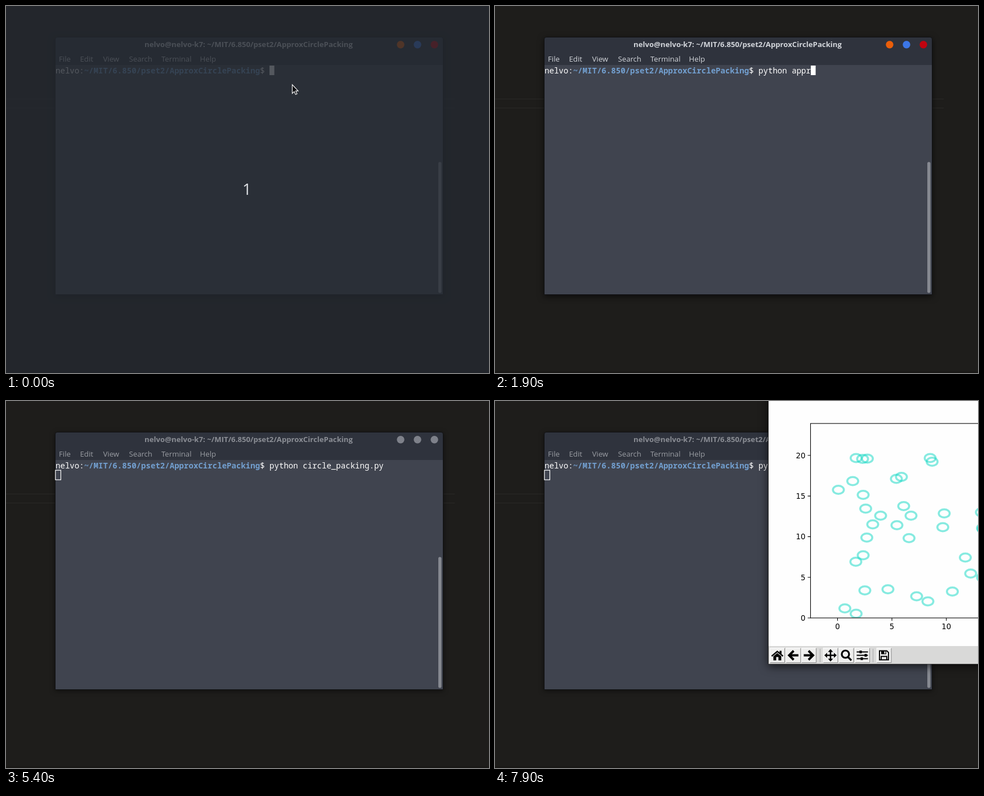
An HTML page for the animation above (8 s loop, 858 px wide and 653 px high).

```html
<!DOCTYPE html>
<html lang="en">
<head>
<meta charset="utf-8">
<title>Circle packing in a terminal</title>
<style>
  html, body { margin: 0; width: 100%; height: 100%; overflow: hidden; background: #1e1d1b; }
  svg { display: block; width: 100vw; height: 100vh; }
  text { white-space: pre; }
  .ui { font-family: "Open Sans", "Noto Sans", sans-serif; font-size: 13.2px; fill: #d3d6db; }
  .title { font-weight: 700; }
  .mono { font-family: "Noto Sans Mono", "DejaVu Sans Mono", monospace; font-size: 14.08px; fill: #fff; }
  .path { font-weight: 700; fill: #729fcf; }
  .count { font-family: "Open Sans", "Noto Sans", sans-serif; font-size: 28px; fill: #dfe2e6; text-anchor: middle; }
  .tick { font-family: "DejaVu Sans", sans-serif; font-size: 13.33px; fill: #000; }
  .frame { fill: #2f333d; stroke: #111214; filter: drop-shadow(0 3px 6px rgba(0, 0, 0, .6)); }
  .blurred .frame { filter: drop-shadow(0 2px 4px rgba(0, 0, 0, .5)); }
  .blurred .title { fill: #8b8e95; }
  .blurred .menu { fill: #9a9da3; }
  .blurred .button { fill: #7e818a; }
  .plot-frame { fill: #fefefe; stroke: #222; filter: drop-shadow(0 4px 8px rgba(0, 0, 0, .65)); }
  .ring { fill: none; stroke: #10d8c4; stroke-opacity: .5; stroke-width: 3.6; }
  .axis { fill: none; stroke: #000; stroke-width: 1.1; }
  .icon { fill: none; stroke: #000; }
  .solid { fill: #000; stroke: none; }
</style>
</head>
<body>
<svg id="stage" viewBox="0 0 858 653" preserveAspectRatio="none">
  <defs>
    <clipPath id="axes"><rect x="560.5" y="40" width="496" height="346"/></clipPath>
  </defs>
  <rect width="858" height="653" fill="#1e1d1b"/>
  <path d="M0 165.5H797M0 181.5H797" stroke="#2a2927"/>
  <rect y="650" width="858" height="3" fill="#191816"/>

  <g id="terminal">
    <path class="frame" d="M87.5 513.5V59q0-3.5 3.5-3.5H773q3.5 0 3.5 3.5V513.5Z"/>
    <rect x="88" y="105" width="688" height="408" fill="#40444f"/>
    <rect x="768" y="277.5" width="5.5" height="233" rx="2.75" fill="#868991"/>
    <g id="chrome"></g>
    <g id="prompt"></g>
    <rect id="cursor" width="8.6" height="17" fill="#fff"/>
    <rect id="hollow" x="87.8" y="123.2" width="9.6" height="17" fill="none" stroke="#fff" stroke-width="1.2"/>
  </g>

  <g id="beam" fill="none">
    <path d="M507 135.5h2.5l.5.5.5-.5h2.5M510 136v12.500M507 148.500h2.500l.5-.5.5.5h2.500" stroke="#e8e8e8" stroke-width="3"/>
    <path d="M507.500 135.500h5M510 136v12.500M507.500 148.500h5" stroke="#16181c"/>
  </g>

  <g id="plot">
    <rect class="plot-frame" x="485.500" y="-80" width="640" height="548"/>
    <rect x="486" y="436" width="639" height="31.500" fill="#d9d9d8"/>
    <path d="M577.500 441V465M671.500 441V465" stroke="#aaa"/>
    <g id="tools"></g>
    <g id="rings" clip-path="url(#axes)"></g>
    <rect class="axis" x="560.500" y="40" width="496" height="346"/>
    <g id="ticks"></g>
  </g>

  <g id="countdown">
    <rect width="858" height="653" fill="#252931" fill-opacity=".78"/>
    <text class="count" x="428" y="336">1</text>
    <path d="M508.500 140V155.500L512 152.200 514.500 157.500 517 156.300 514.600 151.200H519Z"
      fill="#0c0d10" stroke="#f2f2f2" stroke-width="1.200"/>
  </g>
</svg>

<script>
const LOOP = 8000;
const LEFT = 88, CELL = 8.446, PROMPT_COLS = 45;
const USER = "nelvo", FOLDER = "~/MIT/6.850/pset2/ApproxCirclePacking";
const $ = id => document.getElementById(id);
const col = n => LEFT + n * CELL;

function add(parent, tag, attrs, text) {
  const el = document.createElementNS("http://www.w3.org/2000/svg", tag);
  for (const [key, value] of Object.entries(attrs)) el.setAttribute(key, value);
  if (text !== undefined) el.textContent = text;
  parent.append(el);
  return el;
}

// Title bar and menu
add($("chrome"), "text", { class: "ui title", x: 246, y: 73.3 }, `${USER}@${USER}-k7: ${FOLDER}`);
["#ea5e0a", "#3c76e6", "#c0040f"].forEach((fill, i) =>
  add($("chrome"), "circle", { class: "button", cx: 701 + 30 * i, cy: 68.8, r: 6.7, fill }));
Object.entries({ File: 94, Edit: 131.5, View: 172.5, Search: 218.5, Terminal: 276, Help: 344.5 })
  .forEach(([label, x]) => add($("chrome"), "text", { class: "ui menu", x, y: 98.5 }, label));

// Shell line
const shellText = (n, text, extra = "") =>
  add($("prompt"), "text", { class: "mono " + extra, x: col(n), y: 120 }, text);
shellText(0, USER + ":");
shellText(6, FOLDER, "path");
shellText(43, "$");
const command = shellText(PROMPT_COLS, "");

// Plot
const plotX = v => 608.5 + 19.32 * v;
const plotY = v => 386 - 14.46 * v;
for (let v = 0; v <= 20; v += 5) {
  const x = plotX(v), y = plotY(v);
  add($("ticks"), "path", { class: "axis", d: `M${x} 386v5M560.5 ${y}h-5` });
  add($("ticks"), "text", { class: "tick", x, y: 406, "text-anchor": "middle" }, v);
  add($("ticks"), "text", { class: "tick", x: 551.5, y: y + 5, "text-anchor": "end" }, v);
}

const centers = [
  [641.5, 101.5], [653, 103], [661.5, 102.5], [773, 101.5], [776.5, 108], [713, 138.5],
  [722, 135], [635.5, 142.5], [610, 158], [654, 167], [658.5, 191.5], [685, 204],
  [671, 219.5], [726, 187], [739, 204], [714, 221], [660.5, 243], [735.5, 244],
  [654, 274.5], [641, 286], [798, 200], [795.5, 224.5], [835.5, 278.5], [845, 307],
  [812.5, 339], [749, 347.5], [769, 356.5], [698, 335], [621.5, 369], [641.5, 378.5],
  [864, 198], [866, 226], [867, 228], [866, 314]
];
const ring = ([cx, cy]) => add($("rings"), "ellipse", { class: "ring", cx, cy, rx: 9.7, ry: 7.2 });
centers.forEach(ring);
const newest = ring([657, 337]);

// Toolbar icons, each centred on 0,0: stroked path, stroke width, filled path
const arrow = "M9 0H-7M.5-8L-7.500 0L.5 8";
const tools = [
  [501.5, "M-10 1.500L0-7L10 1.500", 2.4, "M-7 1.800L0-4L7 1.800V9H2V3H-2V9H-7ZM4-8H7.500V-1L4-4Z"],
  [530, arrow, 4],
  [557.5, arrow, 4, "", -1],
  [596, "M-7 0H7M0-7V7", 2.6, "M-11 0l5-4.500v9ZM11 0l-5-4.500v9ZM0-11l-4.500 5h9ZM0 11l-4.500-5h9Z"],
  [624, "M5-2A6.500 6.500 0 1 1-8-2A6.500 6.500 0 1 1 5-2M3 3L9 9", 3.2],
  [652.5, "M-10-6H10M-10 0H10M-10 6H10", 2, "M-5-8.500h4v5h-4ZM4-2.500h4v5h-4ZM-3 3.500h4v5h-4Z"],
  [691, "M-8-8H5L8-5V8H-8ZM-5 8V2H5V8", 1.9, "M-5-8H4V-2H-5Z"]
];
for (const [x, line, width, fill = "", flip = 1] of tools) {
  const g = add($("tools"), "g", { transform: `translate(${x} 452.5)` });
  add(g, "rect", { x: -12.5, y: -12.5, width: 25, height: 25, fill: "#efefee" });
  add(g, "path", { d: "M-12.500 13H13V-12.500", fill: "none", stroke: "#8c8c8c" });
  add(g, "path", { d: "M-13 12.500V-13H12.500", fill: "none", stroke: "#fff" });
  const icon = add(g, "g", { transform: `scale(${flip} 1)` });
  add(icon, "path", { class: "icon", d: line, "stroke-width": width });
  add(icon, "path", { class: "solid", d: fill });
}
add($("tools"), "rect", { x: 691.5, y: 445.5, width: 2.2, height: 4, fill: "#efefee" });

// Typing: time, command, cursor state
const FULL = "python circle_packing.py ";
const steps = [
  [0, "", "on"], [200, "", "off"],
  [400, "p", "on"], [500, "py", "on"], [700, "pyt", "on"], [900, "pytho", "on"],
  [1100, "python", "on"], [1300, "python ", "on"], [1400, "python a", "on"],
  [1500, "python ap", "on"], [1900, "python appr", "on"], [2600, "python appr", "off"],
  [2900, "python app", "on"], [3000, "python ap", "on"], [3100, "python a", "on"],
  [3300, "python ", "on"], [3500, "python c", "on"], [3600, "python cir", "on"],
  [4000, FULL, "on"], [4400, FULL, "off"], [4700, FULL, "newline"], [5400, FULL, "hollow"]
];
const show = (el, visible) => { el.style.display = visible ? "" : "none"; };
const within = (t, from, to) => t >= from && t < to;

function render(t) {
  const [, typed, state] = steps.findLast(([start]) => start <= t);
  const newline = state === "newline";
  command.textContent = typed;
  $("cursor").setAttribute("x", newline ? LEFT : col(PROMPT_COLS + typed.length));
  $("cursor").setAttribute("y", newline ? 123 : 106);
  show($("cursor"), state === "on" || newline);
  show($("hollow"), state === "hollow");
  $("terminal").classList.toggle("blurred", t >= 5400);

  show($("countdown"), t < 200);
  show($("beam"), within(t, 200, 400) || within(t, 6700, 6800));

  show($("plot"), t >= 7800);
  $("plot").setAttribute("transform", t < 7900 ? "translate(141 -82)" : "translate(0 0)");
  show(newest, t >= 7900);
}

function tick() {
  render(performance.now() % LOOP);
  requestAnimationFrame(tick);
}
tick();
</script>
</body>
</html>
```
